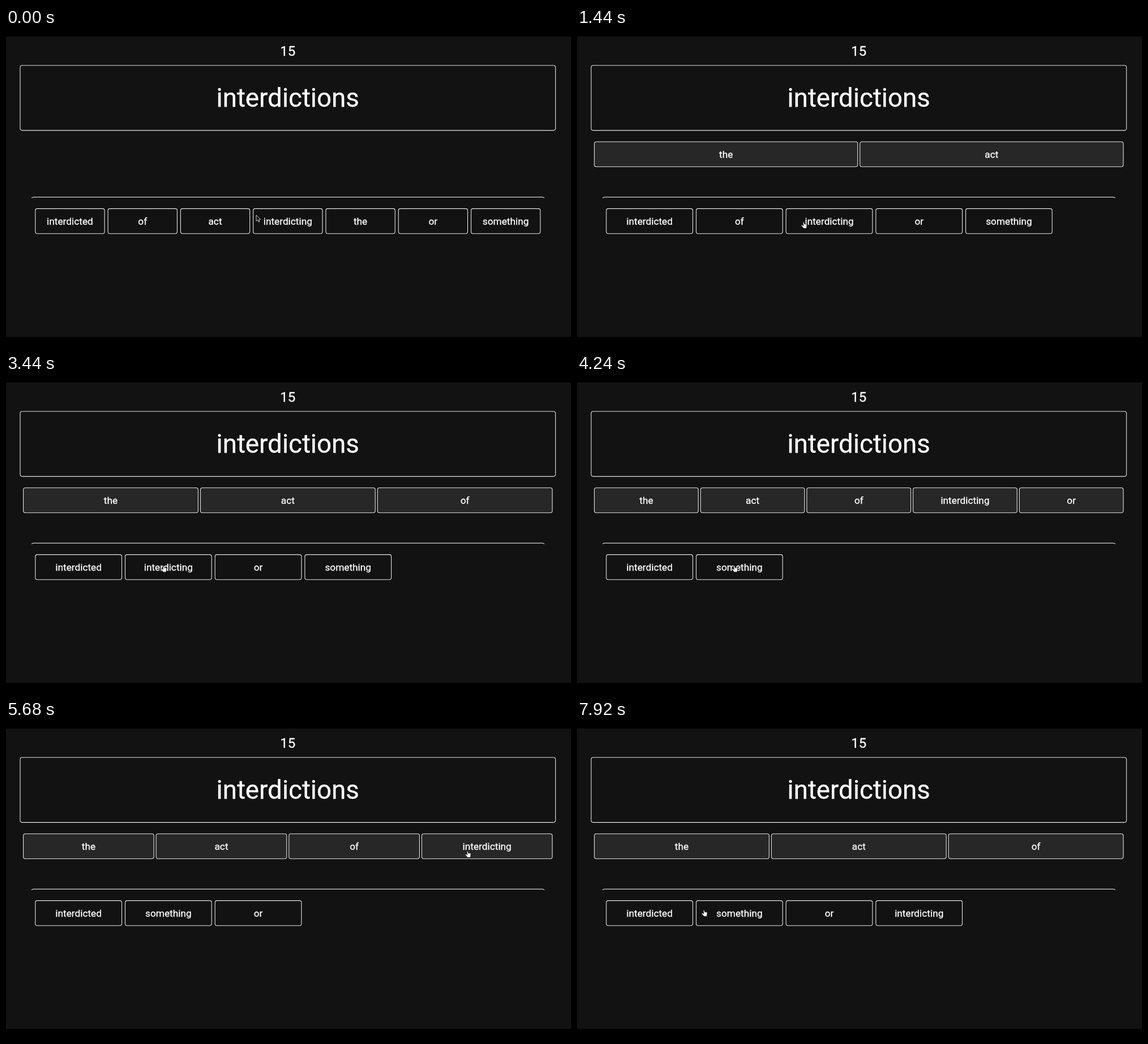
Animation, 998 px wide and 561 px high, one loop 8000 ms. Source, as an HTML page:

```html
<!DOCTYPE html>
<html lang="en">
<head>
<meta charset="utf-8">
<title>Word order game</title>
<style>
  html, body { margin: 0; width: 100%; height: 100%; overflow: hidden; background: #000; }
  svg { display: block; width: 998px; height: 561px; }
  text { font: 17.25px Roboto, Arial, sans-serif; fill: #fff; stroke: #fff; stroke-width: .3; text-anchor: middle; }
  .count { font-size: 24px; }
  .title { font-size: 45.7px; }
  .box { fill: none; stroke: #e4e4e4; stroke-width: 1.1; }
  .picked { fill: #272727; }
</style>
</head>
<body>
<svg viewBox="0 0 998 561">
  <rect y="15" width="998" height="530" fill="#121212"/>
  <text class="count" x="497.8" y="48.8">15</text>
  <rect class="box" x="25" y="66" width="945.6" height="114.6" rx="3.5"/>
  <text class="title" x="497.7" y="139.3">interdictions</text>
  <path d="M45.3 300Q46 298.4 49 298.4H947Q950 298.4 950.8 300" fill="none" stroke="#cfcfcf" stroke-width="1.2"/>
  <g id="words"></g>
  <g id="cursor" stroke="#111" stroke-width=".8" stroke-linejoin="round">
    <path id="arrow" d="M0 0V10.6L2.6 8.5L4 12.2L6 11.4L4.5 7.9H7.6Z" fill="#111" stroke="#f4f4f4"/>
    <path id="hand" d="M-1 2Q-.8 .6 .4 1L2 5L5 4.8L6.2 6L5.4 12.4H.2L-3.8 7.4Q-3.6 6.2-2.2 6.6L0 7.8Z" fill="#fff"/>
  </g>
</svg>
<script>
const LOOP = 8000, STEP = 80, MOVE = 320, HEIGHT = 44.1;
const WORDS = ['interdicted', 'of', 'act', 'interdicting', 'the', 'or', 'something'];

// a click sends a word to the end of the other row
const CLICKS = [
  [800, 'the'], [1440, 'act'], [1840, 'of'], [3680, 'interdicting'],
  [4240, 'or'], [5680, 'or'], [6320, 'interdicting']
];

// pointer stops: arrival time, x, y
const STOPS = [
  [0, 442, 330], [320, 858, 356], [640, 642, 342], [1200, 400, 341],
  [1760, 323, 337], [2400, 277.5, 337], [5120, 560, 290], [5520, 815, 230],
  [6640, 297, 288], [7200, 285, 358], [7600, 309, 338], [7920, 224, 334]
];

const TOP = { x: 30.6, y: 200.7, width: 934.4, gap: 4, max: 998, cls: 'box picked' };
const BOTTOM = { x: 51.8, y: 318.6, width: 892, gap: 6, max: 152.7, cls: 'box' };

const $ = id => document.getElementById(id);

function rowsAt(t) {
  let top = [], bottom = WORDS;
  for (const [when, word] of CLICKS) {
    if (t < when) break;
    const rest = row => row.filter(w => w !== word);
    if (top.includes(word)) [top, bottom] = [rest(top), [...bottom, word]];
    else [top, bottom] = [[...top, word], rest(bottom)];
  }
  return [top, bottom];
}

function layout(words, row) {
  const n = words.length;
  const w = Math.min((row.width - (n - 1) * row.gap) / n, row.max);
  return words.map((word, i) => ({
    word, w, cls: row.cls, x: row.x + i * (w + row.gap), y: row.y
  }));
}

// rest at each stop, then glide for MOVE ms to reach the next one on time
function pointerAt(t) {
  let [, x, y] = STOPS[0];
  for (const [end, x1, y1] of STOPS.slice(1)) {
    const k = Math.max(0, Math.min(1, 1 - (end - t) / MOVE));
    const e = k * k * (3 - 2 * k);
    x += (x1 - x) * e;
    y += (y1 - y) * e;
  }
  return [x, y];
}

const boxMarkup = b =>
  `<rect class="${b.cls}" x="${b.x}" y="${b.y}" width="${b.w}" height="${HEIGHT}" rx="3.5"/>` +
  `<text x="${b.x + b.w / 2}" y="${b.y + 28.2}">${b.word}</text>`;

let shown = '';
function draw(t) {
  const [top, bottom] = rowsAt(t);
  const boxes = [...layout(top, TOP), ...layout(bottom, BOTTOM)];
  const markup = boxes.map(boxMarkup).join('');
  if (markup !== shown) $('words').innerHTML = shown = markup;

  // the arrow turns into a hand over a word, once the pointer has moved
  const [x, y] = pointerAt(t);
  const over = t > 0 && boxes.some(b => x > b.x && x < b.x + b.w && y > b.y && y < b.y + HEIGHT);
  $('cursor').setAttribute('transform', `translate(${x} ${y})`);
  $('hand').style.display = over ? '' : 'none';
  $('arrow').style.display = over ? 'none' : '';
}

const start = performance.now();
function tick() {
  const t = (performance.now() - start) % LOOP;
  draw(Math.floor(t / STEP) * STEP);
  requestAnimationFrame(tick);
}
tick();
</script>
</body>
</html>
```
